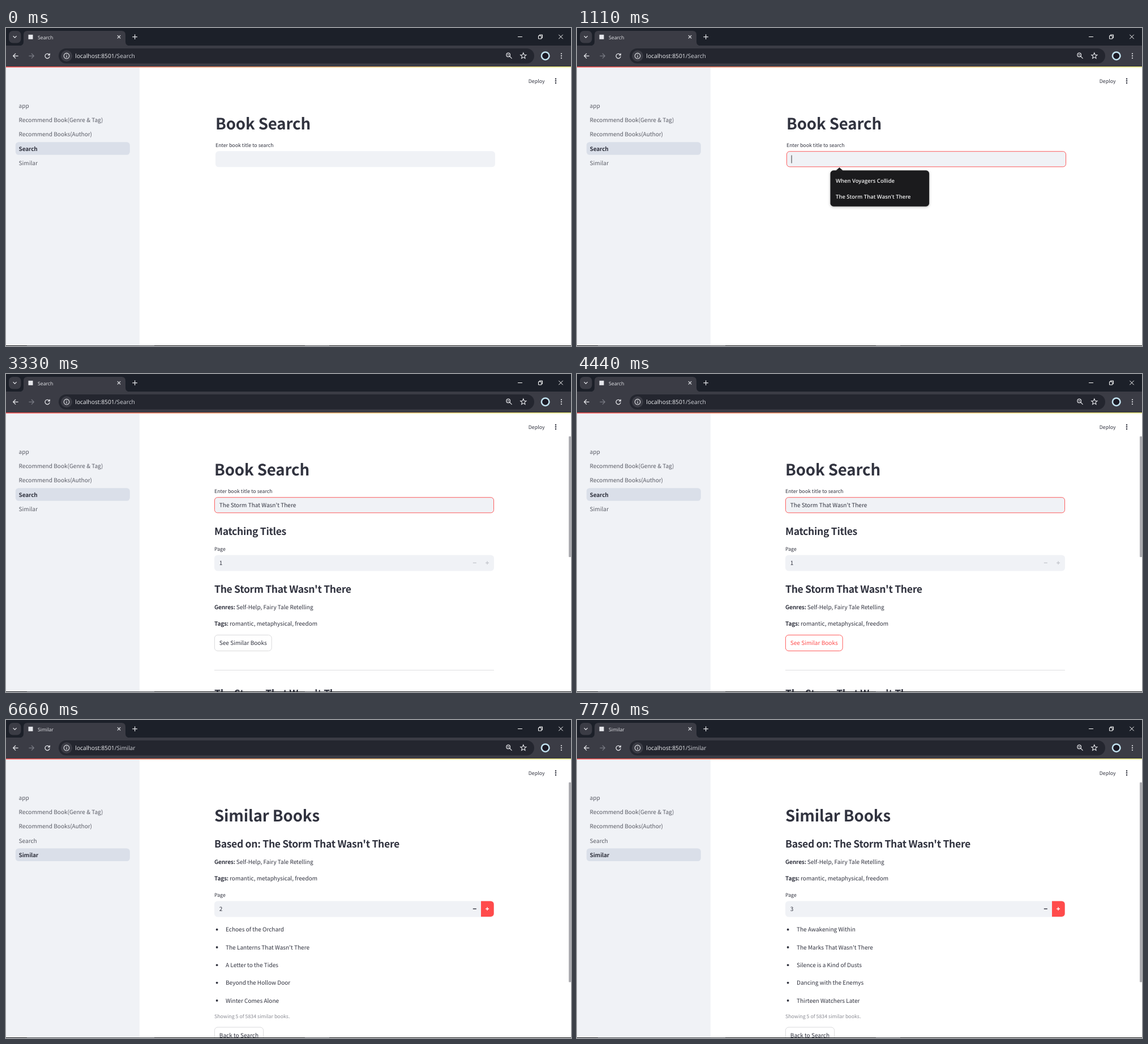
An HTML page with a canvas that plays this animation: 998 px wide and 561 px high, repeating every 8.88 s.

```html
<!DOCTYPE html>
<html lang="en">
<head>
<meta charset="utf-8">
<title>Book Search</title>
<style>
html, body { margin: 0; width: 100%; height: 100%; overflow: hidden; background: #fff; }
canvas { display: block; width: 998px; height: 561px; }
</style>
</head>
<body>
<canvas id="stage"></canvas>
<script>
const W = 998, H = 561, STEP = 1110, LOOP = 8880;
const canvas = document.getElementById('stage');
const ctx = canvas.getContext('2d');
const dpr = window.devicePixelRatio || 1;
canvas.width = W * dpr;
canvas.height = H * dpr;

const PAGE = '"Noto Sans CJK JP", "Noto Sans CJK SC", "Noto Sans CJK", sans-serif';
const UI = '"Open Sans", "Noto Sans", sans-serif';
const BODY = 10.05, LABEL = 8.79, SMALL = 7.54, H1 = 27.65, H3 = 17.6;
const INK = '#31333f', RED = '#ff4b4b', FIELD = '#f0f2f6', FAINT = '#d6d6d9', OFF = '#c6c8cf';
const LIGHT = '#e6e7eb', STRIP = '#1c2029', BAR = '#3b3c45', OMNI = '#24262f';

const BOOK = "The Storm That Wasn't There";
const LISTS = {
  1: ['The Sound of Childs', 'The Ghost in the Mirror', 'Notes on a Frigid Existence',
      'Where Lies Go to Die', 'Legacy of the Nomad'],
  2: ['Echoes of the Orchard', "The Lanterns That Wasn't There", 'A Letter to the Tides',
      'Beyond the Hollow Door', 'Winter Comes Alone'],
  3: ['The Awakening Within', "The Marks That Wasn't There", 'Silence is a Kind of Dusts',
      'Dancing with the Enemys', 'Thirteen Watchers Later']
};

function text(str, x, y, size, color = INK, weight = 400, family = PAGE, spacing = 0) {
  ctx.font = `${weight} ${size}px ${family}`;
  ctx.letterSpacing = spacing + 'px';
  ctx.fillStyle = color;
  ctx.fillText(str, x, y);
}

function rect(x, y, w, h, color) {
  ctx.fillStyle = color;
  ctx.fillRect(x, y, w, h);
}

function round(x, y, w, h, r, fill, stroke, width = 0.9) {
  ctx.beginPath();
  ctx.roundRect(x, y, w, h, r);
  if (fill) { ctx.fillStyle = fill; ctx.fill(); }
  if (stroke) { ctx.strokeStyle = stroke; ctx.lineWidth = width; ctx.stroke(); }
}

function disc(x, y, r, color) {
  ctx.beginPath();
  ctx.arc(x, y, r, 0, Math.PI * 2);
  ctx.fillStyle = color;
  ctx.fill();
}

function path(d, x, y, color, width = 1.2) {
  ctx.save();
  ctx.translate(x, y);
  ctx.strokeStyle = color;
  ctx.lineWidth = width;
  ctx.stroke(new Path2D(d));
  ctx.restore();
}

function dots(x, y, gap, r, color) {
  for (let i = -1; i <= 1; i++) disc(x, y + i * gap, r, color);
}

function drawBrowser(page) {
  rect(0, 0, W, 32, STRIP);
  rect(0, 31, W, 37.5, BAR);

  round(5, 5, 21.5, 21.5, 7, BAR);
  path('M-3-1.5L0 1.5L3-1.5', 15.6, 15.6, LIGHT, 1.3);

  // active tab with flared feet
  ctx.fillStyle = BAR;
  ctx.fill(new Path2D('M24 31.5Q31 31 31 24V12Q31 5 38 5H204Q211 5 211 12V24Q211 31 218 31.5Z'));
  round(39.5, 11.8, 8, 8, 0, LIGHT);
  text(page, 56, 19.6, 8.7, LIGHT, 400, UI);
  path('M-2.7-2.7L2.7 2.7M2.7-2.7L-2.7 2.7', 199.5, 15.6, LIGHT, 1.2);
  path('M-4.3 0H4.3M0-4.3V4.3', 227.6, 15.6, LIGHT, 1.2);

  path('M-4 0H4', 908, 15.5, '#fff', 1);
  path('M-3.5-1.8H1.8V3.5H-3.5ZM-1.8-2V-3.5H3.5V1.8H2', 944, 15.5, '#fff', 1);
  path('M-3.7-3.7L3.7 3.7M3.7-3.7L-3.7 3.7', 980, 15.5, '#fff', 1);

  path('M4.6 0H-4.2M0-4.3L-4.3 0L0 4.3', 17, 49.3, LIGHT, 1.3);
  path('M-4.6 0H4.2M0-4.3L4.3 0L0 4.3', 45, 49.3, '#777982', 1.3);
  path('M3.6-1.9A4.1 4.1 0 1 0 4.1 .8M4.2-4.6V-1.4H1', 73, 49.3, LIGHT, 1.3);

  round(93, 36, 840, 26.5, 13.2, OMNI);
  disc(107, 49.2, 10, BAR);
  path('M4.8 0A4.8 4.8 0 1 1-4.8 0A4.8 4.8 0 1 1 4.8 0M0-.8V2.7M0-2.8V-1.6', 107, 49.2, LIGHT, 1.1);
  const host = 'localhost:8501';
  text(host, 122.3, 52.9, 10.3, '#f0f1f4', 400, UI);
  text('/' + page, 122.3 + ctx.measureText(host).width, 52.9, 10.3, '#d0d2d8', 400, UI);

  path('M2-1.6A3.3 3.3 0 1 1-4.6-1.6A3.3 3.3 0 1 1 2-1.6M1.2 .9L5 4.8M-2.8-1.6H.2', 888.5, 49, LIGHT, 1.2);
  const star = Array.from({ length: 10 }, (_, i) => {
    const a = -Math.PI / 2 + i * Math.PI / 5, r = i % 2 ? 2.4 : 5.4;
    return `${r * Math.cos(a)} ${r * Math.sin(a)}`;
  });
  path('M' + star.join('L') + 'Z', 913.8, 49.2, LIGHT, 1.1);
  disc(952.7, 49.2, 8, '#c3e3f0');
  disc(952.7, 49.2, 5.5, '#1b1a25');
  dots(981, 49.2, 3.9, 1.1, LIGHT);
}

function drawShell(page) {
  rect(0, 0, W, H, '#fff');
  rect(0, 68, 235.8, 493, FIELD);
  drawBrowser(page);

  const glow = ctx.createLinearGradient(0, 0, W, 0);
  glow.addColorStop(0, RED);
  glow.addColorStop(1, '#fffd80');
  rect(0, 68, W, 1.5, glow);

  ['app', 'Recommend Book(Genre & Tag)', 'Recommend Books(Author)', 'Search', 'Similar'].forEach((name, i) => {
    const y = 140.8 + i * 25.25, active = name === page;
    if (active) round(16.8, y - 15.4, 202, 22.7, 5.6, '#dadfe9');
    text(name, 22.6, y, BODY, active ? INK : '#5a5c66', active ? 600 : 400, PAGE, active ? -0.15 : 0);
  });

  text('Deploy', 922.8, 96.9, LABEL);
  dots(971, 93.3, 3.6, 1.25, INK);
}

function field(x, y, border, fill = FIELD) {
  round(x, y, 494, 28, 5.6, fill);
  if (border) round(x + 0.45, y + 0.45, 493.1, 27.1, 5.2, null, border);
}

function title(str, x) { text(str, x, 179, H1, INK, 700, PAGE, -0.15); }
function heading(str, y) { text(str, 368, y, H3, INK, 600, PAGE, -0.34); }

function details(y) {
  text('Genres:', 368, y, BODY, INK, 600, PAGE, -0.15);
  text('Self-Help, Fairy Tale Retelling', 406.7, y, BODY);
  text('Tags:', 368, y + 29.2, BODY, INK, 600, PAGE, -0.15);
  text('romantic, metaphysical, freedom', 395, y + 29.2, BODY);
}

function stepper(value, minus, plus, hover) {
  text('Page', 368, 311.8, LABEL);
  field(368, 319.4);
  text(value, 376.8, 337.2, BODY);
  if (hover) round(839, 319.4, 22.7, 27.6, [0, 5.6, 5.6, 0], RED);
  path('M-3 0H3', 827.8, 333.2, minus, 1.4);
  path('M-2.9 0H2.9M0-2.9V2.9', 850.1, 333.2, plus, 1.4);
}

function button(str, y, w, color, border) {
  round(368.4, y, w, 28, 5.6, '#fff', border);
  text(str, 376.8, y + 17.6, BODY, color);
}

function thumb(h) { round(994, 110, 4, h, 1, '#adadb2'); }

function drawSuggestions() {
  ctx.save();
  ctx.shadowColor = 'rgba(0,0,0,.3)';
  ctx.shadowBlur = 4 * dpr;
  ctx.shadowOffsetY = dpr;
  round(447.5, 251.3, 174.6, 63.4, 5.5, '#1b1b1d');
  ctx.restore();
  ctx.fillStyle = '#1b1b1d';
  ctx.fill(new Path2D('M457 251.8L463.5 246L470 251.8Z'));
  text('When Voyagers Collide', 457, 272.6, 9.5, '#f1f1f1', 600, UI);
  text(BOOK, 457, 300.6, 9.5, '#f1f1f1', 600, UI);
}

function drawForm(x, border, fill) {
  title('Book Search', x);
  text('Enter book title to search', x, 209.8, LABEL);
  field(x, 217.3, border, fill);
}

function drawEntry(scene) {
  drawForm(370, scene ? RED : null, scene === 2 ? '#e8f0fe' : FIELD);
  if (scene === 1) {
    rect(378.6, 224.5, 0.9, 14, '#222');
    drawSuggestions();
  }
  if (scene === 2) {
    text(BOOK, 378.8, 235, BODY, '#000');
    rect(514.2, 224.5, 0.9, 14, '#222');
    text('Press Enter to apply', 787.6, 240.3, SMALL, '#85868f');
  }
}

function drawResults(hover) {
  drawForm(368, RED);
  text(BOOK, 376.8, 235, BODY);
  heading('Matching Titles', 283.8);
  stepper('1', OFF, OFF, false);
  heading(BOOK, 385.8);
  details(414.5);
  button('See Similar Books', 460.5, 100.8, hover ? RED : INK, hover ? RED : FAINT);
  rect(368, 522, 494, 0.8, FAINT);
  heading(BOOK, 570.4);
  thumb(213);
}

function drawSimilar(page) {
  title('Similar Books', 368);
  heading('Based on: ' + BOOK, 225.3);
  details(254.1);
  stepper(String(page), page > 1 ? INK : OFF, page > 1 ? '#fff' : INK, page > 1);
  LISTS[page].forEach((name, i) => {
    const y = 373.3 + i * 31.3;
    disc(372.6, y - 3.6, 1.9, INK);
    text(name, 388, y, BODY);
  });
  text('Showing 5 of 5834 similar books.', 368, 526.2, LABEL, '#8b8c94');
  button('Back to Search', 542, 86.2, INK, FAINT);
  thumb(352.5);
}

function draw(ms) {
  const scene = Math.floor((ms % LOOP) / STEP);
  ctx.setTransform(dpr, 0, 0, dpr, 0, 0);
  ctx.textRendering = 'geometricPrecision';
  drawShell(scene < 5 ? 'Search' : 'Similar');
  if (scene < 3) drawEntry(scene);
  else if (scene < 5) drawResults(scene === 4);
  else drawSimilar(scene - 4);

  // sliver of the taskbar
  rect(0, 560, W, 1, '#111316');
  rect(37, 560, 225, 1, '#4c4e52');
  rect(528, 560, 43, 1, '#4c4e52');
}

const start = performance.now();
function tick() {
  draw(performance.now() - start);
  requestAnimationFrame(tick);
}
tick();
</script>
</body>
</html>
```
